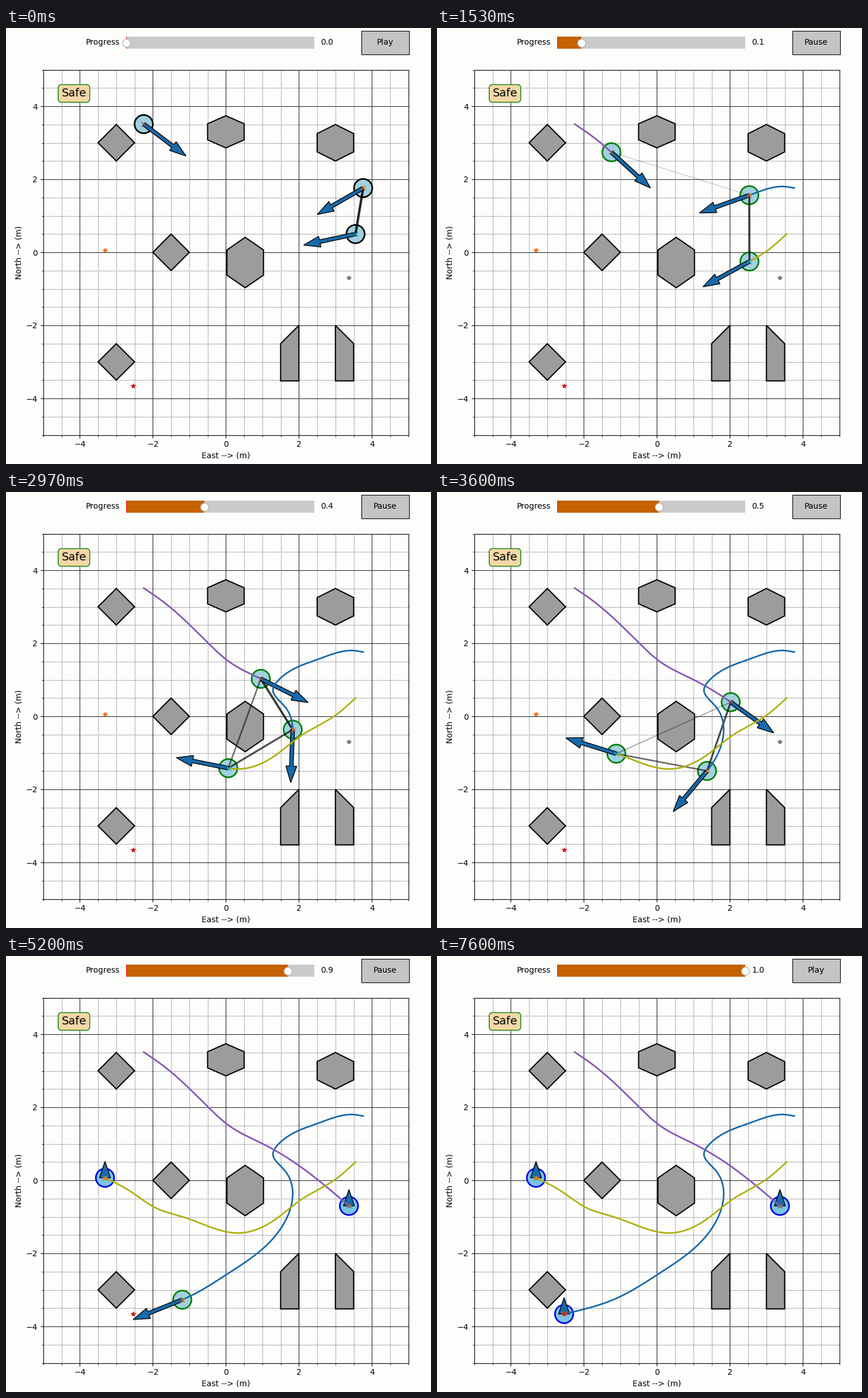
A matplotlib script for the animation above (7.63 s loop, 739x758 px).

```python
import itertools

import matplotlib.pyplot as plt
import numpy as np
from matplotlib.animation import FuncAnimation
from matplotlib.patches import Circle, Polygon, Rectangle

W, H, DPI = 739, 758, 100
LOOP, FRAMES = 7630, 230
START, RUN = 0.883, 4.99      # seconds: play pressed, playback length
SPEED = 9.84                  # metres travelled over the whole run
BAR_X, BAR_W = 208.7, 327.5

plt.rcParams.update({"font.family": "DejaVu Sans", "font.size": 10})
fig = plt.figure(figsize=(W / DPI, H / DPI), dpi=DPI, facecolor="#fdfdfb")

# Controls, laid out in pixels
ui = fig.add_axes([0, 0, 1, 1], xlim=(0, W), ylim=(H, 0))
ui.axis("off")
ui.plot([0, W], [757.5, 757.5], color="#8a8a8a", lw=0.72)


def bar(width, color):
    return ui.add_patch(Rectangle((BAR_X, 15.4), width, 20.3, fc=color, ec="none"))


bar(BAR_W, "#cacaca")
fill = bar(0, "#c46200")
bar(1, "red")
knob, = ui.plot([BAR_X], [25.6], "o", ms=10, mfc="white", mec="0.72", zorder=4)
ui.text(197.5, 25.3, "Progress", ha="right", va="center")
value = ui.text(547, 25.3, "0.0", ha="left", va="center")
ui.add_patch(Rectangle((618, 5), 82.5, 41, fc="#c4c4c4", ec="black", lw=0.8))
button = ui.text(659.2, 25.3, "Play", ha="center", va="center")

# Map
ax = fig.add_axes([64.8 / W, 50.5 / H, 635 / W, 635 / H],
                  xlim=(-5, 5), ylim=(-5, 5), facecolor="#fdfdfb")
ax.set_xlabel("East --> (m)")
ax.set_ylabel("North --> (m)")
major = np.arange(-4, 5, 2)
minor = np.setdiff1d(np.arange(-10, 11) / 2, major)
ax.set_xticks(major)
ax.set_yticks(major)
for at, style, color in ((minor, ":", "#44445a"), (major, "-", "#2a2a36")):
    grid = dict(colors=color, linestyles=style, lw=0.8, zorder=0.5)
    ax.hlines(at, -5, 5, **grid)
    ax.vlines(at, -5, 5, **grid)
edge = np.full(len(minor), -5)
for x, y, mark in ((minor, edge, 3), (edge, minor, 0)):
    ax.plot(x, y, ls="", marker=mark, ms=2, mew=0.6, color="black", clip_on=False)
ax.text(0.05, 0.95, "Safe", transform=ax.transAxes, fontsize=14, va="top",
        bbox=dict(boxstyle="round,pad=0.3", fc="#f4d7a8", ec="green"), zorder=5)


def obstacle(pts):
    ax.add_patch(Polygon(pts, fc="#9c9c9c", ec="black", lw=1.5, zorder=0.9))


def ngon(n, cx, cy, ry=0.5):
    """Polygon with a corner on top, one metre wide and 2 * ry high."""
    a = np.pi / 2 + 2 * np.pi * np.arange(n) / n
    rx = 0.5 / np.cos(a).max()
    obstacle(np.column_stack([cx + rx * np.cos(a), cy + ry * np.sin(a)]))


for x, y in ((-3, 3), (-1.5, 0), (-3, -3)):
    ngon(4, x, y)
for x, y, ry in ((0, 3.3, 0.44), (3, 3, 0.5), (0.53, -0.28, 0.69)):
    ngon(6, x, y, ry)
for x, side in ((2, -0.5), (3, 0.5)):
    obstacle([(x, -2), (x + side, -2.5), (x + side, -3.52), (x, -3.52)])


def spline(pts):
    """Natural cubic spline through the points, with its arc length."""
    pts = np.asarray(pts, float)
    u = np.r_[0, np.cumsum(np.hypot(*np.diff(pts, axis=0).T))]
    h, n = np.diff(u), len(u)
    slope = np.diff(pts, axis=0) / h[:, None]
    a, b = np.eye(n), np.zeros((n, 2))
    for k in range(1, n - 1):
        a[k, k - 1:k + 2] = h[k - 1], 2 * (h[k - 1] + h[k]), h[k]
        b[k] = 6 * (slope[k] - slope[k - 1])
    m = np.linalg.solve(a, b)
    t = np.linspace(0, u[-1], 600)
    k = np.clip(np.searchsorted(u, t, "right") - 1, 0, n - 2)
    hk = h[k][:, None]
    f = (t - u[k])[:, None] / hk
    g = 1 - f
    xy = (g * pts[k] + f * pts[k + 1]
          + hk ** 2 / 6 * ((g ** 3 - g) * m[k] + (f ** 3 - f) * m[k + 1]))
    return xy, np.r_[0, np.cumsum(np.hypot(*np.diff(xy, axis=0).T))]


def arrow(pos, angle, length):
    x = np.array([0, length, length, length + 0.45, length, length, 0])
    y = np.array([-0.05, -0.05, -0.15, 0, 0.15, 0.05, 0.05])
    c, s = np.cos(angle), np.sin(angle)
    return np.column_stack([pos[0] + c * x - s * y, pos[1] + s * x + c * y])


class Robot:
    def __init__(self, pts, heading, trail, cross, star):
        self.xy, self.s = spline(pts)
        self.length = self.s[-1]
        self.heading = np.radians(heading)
        self.body = ax.add_patch(Circle((0, 0), 0.25, lw=2, zorder=1))
        self.arrow = ax.add_patch(Polygon(arrow((0, 0), 0, 1), fc="#1769aa",
                                          ec="black", lw=1, zorder=1.1))
        self.trail, = ax.plot([], [], color=trail, lw=2, zorder=2)
        self.cross, = ax.plot([], [], "x", color=cross, ms=6, zorder=2.2)
        ax.plot(*self.xy[-1], "*", color=star, ms=6, zorder=2.3)

    def at(self, s):
        return np.array([np.interp(s, self.s, c) for c in self.xy.T])

    def direction(self, s):
        s = min(s, self.length - 0.1)
        dx, dy = self.at(s + 0.1) - self.at(s)
        return np.arctan2(dy, dx)

    def move(self, p):
        s = min(SPEED * p, self.length)
        done = s >= self.length or p >= 1
        self.pos = self.xy[-1] if done else self.at(s)
        self.linked = not done and s < self.length - 0.13
        if done:
            angle, length = np.pi / 2, 0
        else:
            # the first heading turns quickly onto the path
            turn = self.heading - self.direction(s)
            turn = (turn + np.pi) % (2 * np.pi) - np.pi
            angle = self.direction(s) + turn * max(0, 1 - p / 0.03)
            length = 1
        self.arrow.set_xy(arrow(self.pos, angle, length))
        self.body.center = self.pos
        self.body.set_facecolor("#78c4e8" if done else "#a2d0e0")
        self.body.set_edgecolor("#0000e6" if done else "green" if p > 0 else "black")
        self.trail.set_data(*np.vstack([self.xy[self.s < s], self.pos]).T)
        self.cross.set_data(*self.pos[:, None])


# Waypoints in metres
robots = [
    Robot([(3.76, 1.76), (3.5, 1.8), (2.52, 1.56), (1.61, 1.14), (1.29, 0.7),
           (1.62, 0.26), (1.83, -0.39), (1.37, -1.5), (0.08, -2.54),
           (-1.15, -3.25), (-2.54, -3.66)],
          210, "#1769aa", "#f0701a", "#d21f1f"),
    Robot([(-2.25, 3.51), (-1.8, 3.2), (-0.52, 2.04), (0.14, 1.46), (1.01, 1),
           (2.02, 0.39), (3.37, -0.7)],
          -37, "#8557b5", "#8c564b", "#777777"),
    Robot([(3.55, 0.5), (2.96, 0), (2.09, -0.51), (1.22, -1.16), (0.43, -1.44),
           (-1.12, -1.02), (-1.91, -0.76), (-2.63, -0.29), (-3.31, 0.07)],
          192, "#b0b010", "#17a5b8", "#ff7010"),
]
pairs = list(itertools.combinations(robots, 2))
links = [ax.plot([], [], color="black", zorder=1.9)[0] for _ in pairs]


def update(i):
    p = np.clip((i * LOOP / FRAMES / 1000 - START) / RUN, 0, 1)
    fill.set_width(BAR_W * p)
    knob.set_xdata([BAR_X + BAR_W * p])
    value.set_text(f"{p:.1f}")
    button.set_text("Pause" if 0 < p < 1 else "Play")
    for r in robots:
        r.move(p)
    for line, (a, b) in zip(links, pairs):
        # nearer robots share a stronger link, fading out at 5 m
        w = max(0, 1 - np.hypot(*(a.pos - b.pos)) / 5)
        line.set_data(*np.array([a.pos, b.pos]).T)
        line.set_linewidth(4 * w)
        line.set_alpha(min(1, 1.15 * w))
        line.set_visible(a.linked and b.linked and w > 0)
    return []


anim = FuncAnimation(fig, update, frames=FRAMES, init_func=lambda: update(0),
                     interval=LOOP / FRAMES, repeat=True, repeat_delay=0)
plt.show()
```
